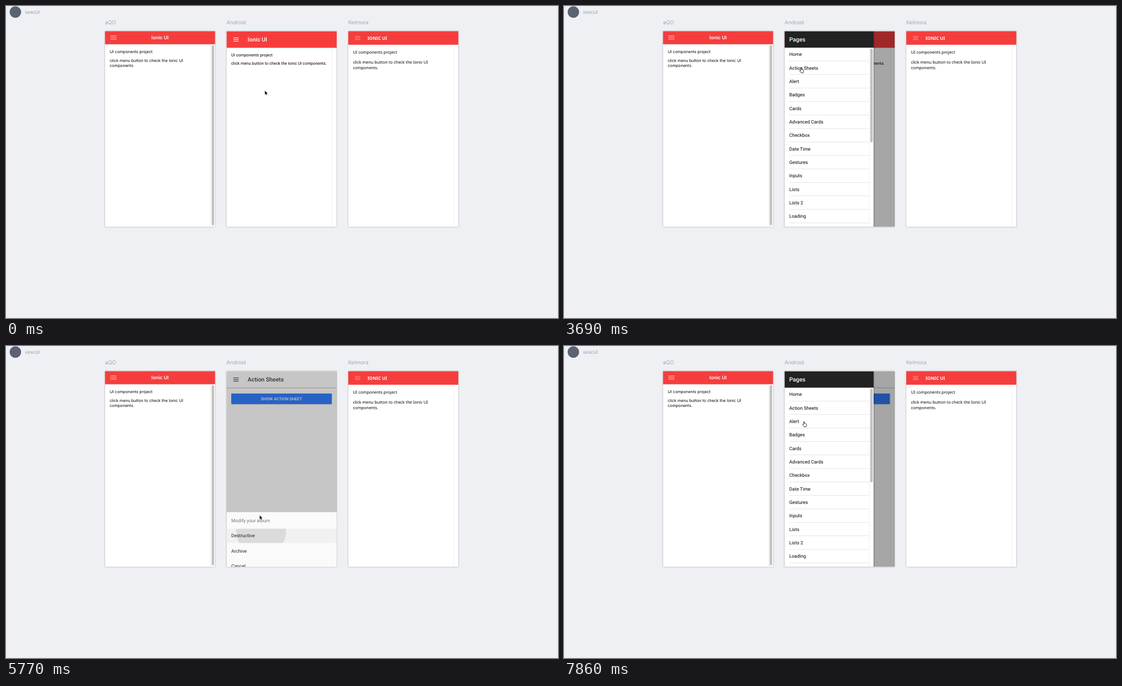
Recreate the animation shown at these times as an HTML page. Size 995 px wide and 563 px high, loop 8000 ms.

```html
<!DOCTYPE html>
<html lang="en">
<head>
<meta charset="utf-8">
<title>Ionic UI preview</title>
<style>
html, body { margin: 0; width: 100%; height: 100%; overflow: hidden; background: #eff0f4; }
svg { display: block; width: 100%; height: 100%; }
text { text-rendering: geometricPrecision; white-space: pre; }
.inter { font-family: Inter, sans-serif; }
.md { font-family: Roboto, sans-serif; }
.noto { font-family: "Noto Sans", sans-serif; }
.label { font: 300 9.6px Inter, sans-serif; fill: #8f939d; }
.card { fill: #fff; filter: drop-shadow(0 .8px 1.1px rgba(0, 0, 0, .38)); }
</style>
</head>
<body>
<svg id="stage" viewBox="0 0 995 563"></svg>
<script>
const RED = '#f63d3d';
const TOP = 45.5, BOTTOM = 398.5, LEFT = 397.5, WIDTH = 198.5;
const BAR = 75.2, ROW = 24.33, MENU = 160.5, SHEET = 114.5;

const rect = (x, y, w, h, fill, more = '') =>
  `<rect x="${x}" y="${y}" width="${w}" height="${h}" fill="${fill}" ${more}/>`;
const text = (x, y, str, size, font, fill = '#000', weight = 400, more = '') =>
  `<text x="${x}" y="${y}" class="${font}" font-size="${size}" font-weight="${weight}" fill="${fill}" ${more}>${str}</text>`;
const burger = (x, y, w, gap, thick, color) =>
  [0, 1, 2].map(i => rect(x, y + i * gap - thick / 2, w, thick, color)).join('');
const card = x => `<rect class="card" x="${x}" y="${TOP}" width="198.3" height="353" rx=".8"/>`;
const track = x => rect(x, BAR, .7, BOTTOM - BAR, '#ececec');
const shade = (id, y, h) => rect(LEFT, y, WIDTH, h, '#000', `id="${id}"`);

const leftCard = card(178.5) +
  rect(178.5, TOP, 198.3, 23.4, RED) +
  rect(178.5, 68.9, 198.3, .5, '#d9a0a0') +
  burger(188, 54, 11, 3, .75, '#fff') +
  text(277.6, 60.3, 'Ionic UI', 8.6, 'inter', '#fff', 600, 'text-anchor="middle"') +
  text(187, 84.6, 'UI components project', 7.2, 'inter') +
  text(187, 101, 'click menu button to check the Ionic UI', 7.2, 'inter') +
  text(187, 109.9, 'components.', 7.2, 'inter') +
  rect(368.6, 69.4, 8.2, 329.1, '#fafafa') +
  rect(368.3, 69.4, .6, 329.1, '#e8e8e8') +
  rect(370.8, 70.4, 4.3, 325.4, '#c1c1c1', 'rx="2.1"');

const rightCard = card(617) +
  rect(617, TOP, 198.3, 24.4, RED) +
  burger(629, 55, 9.6, 2.9, .6, '#ffd5d5') +
  text(651.8, 60.9, 'IONIC UI', 7.9, 'noto', '#fff', 700) +
  text(625.4, 86.4, 'UI components project', 7.4, 'noto') +
  text(625.4, 103.6, 'click menu button to check the Ionic UI', 7.4, 'noto') +
  text(625.4, 113.7, 'components.', 7.4, 'noto') +
  rect(807.2, 69.9, .7, 328.6, '#ececec');

const home = `<g id="home">${
  rect(LEFT, BAR, WIDTH, .9, '#000', 'opacity=".2"') +
  rect(LEFT, TOP, WIDTH, BAR - TOP, RED) +
  burger(409.8, 57.5, 9.5, 3, 1.05, '#fff') +
  text(435.6, 64.1, 'Ionic UI', 10.45, 'md', '#fff', 500) +
  text(406, 90.5, 'UI components project', 7.4, 'md') +
  text(406, 106.3, 'click menu button to check the Ionic UI components.', 7.4, 'md') +
  track(587.8)
}</g>`;

const actions = `<g id="actions">${
  rect(LEFT, BAR, WIDTH, .9, '#000', 'opacity=".28"') +
  burger(409.8, 57.5, 9.5, 3, 1.05, '#424242') +
  text(435.6, 64.1, 'Action Sheets', 10.45, 'md', '#424242', 500) +
  `<g id="line">${track(587.8)}</g>` +
  rect(406, 86.4, 181.3, 19, '#000', 'rx="1" opacity=".22"') +
  rect(406, 85.7, 181.3, 19, '#327eff', 'rx="1" id="button"') +
  '<circle id="tap" cx="479.5" cy="98.5" fill="#555" opacity=".22" clip-path="url(#buttonClip)"/>' +
  text(496.6, 97.9, 'SHOW ACTION SHEET', 7.42, 'md', '#fff', 500, 'text-anchor="middle"')
}</g>`;

// The sheet is drawn with its top edge at y = 0.
const sheet = `<g id="sheet">${
  rect(LEFT, 0, WIDTH, SHEET + 1, '#fafafa') +
  rect(LEFT, 30, WIDTH, 25.7, '#f1f1f1', 'id="pressed"') +
  '<circle id="press" cx="460" cy="34" fill="#555" opacity=".14" clip-path="url(#rowClip)"/>' +
  text(406, 18, 'Modify your album', 8.45, 'md', '#757575') +
  ['Destructive', 'Archive', 'Cancel'].map((s, i) =>
    text(406, 45.6 + i * 27.5, s, 8.45, 'md', '#222')).join('')
}</g>`;

const pages = ['Home', 'Action Sheets', 'Alert', 'Badges', 'Cards', 'Advanced Cards', 'Checkbox',
  'Date Time', 'Gestures', 'Inputs', 'Lists', 'Lists 2', 'Loading'];
const menu = `<g id="menu">${
  rect(LEFT + MENU, TOP, .8, 353, '#000', 'opacity=".22"') +
  rect(LEFT + MENU + .8, TOP, 1.2, 353, '#000', 'opacity=".1"') +
  rect(LEFT, TOP, MENU, 353, '#fff') +
  rect(LEFT, TOP, MENU, BAR - TOP, '#222') +
  text(406, 64.1, 'Pages', 10.45, 'md', '#fff', 500) +
  pages.map((s, i) =>
    text(406, BAR + i * ROW + 15.2, s, 8.45, 'md') +
    rect(406, BAR + (i + 1) * ROW - .4, 144.6, .6, '#d4d4d4')).join('') +
  rect(550.3, BAR, .6, BOTTOM - BAR, '#e8e8e8') +
  rect(552, 77, 4.6, 169, '#c1c1c1', 'rx="2.2" id="thumb"')
}</g>`;

const cursor = `<g id="cursor" stroke-linejoin="round">
  <path id="arrow" d="M0 0V8.2L1.9 6.5 3.1 9.2 4.5 8.6 3.3 6H5.9Z" fill="#000" stroke="#fff" stroke-width=".6"/>
  <path id="hand" d="M-.7 5.3V.8a.8.8 0 0 1 1.6 0V3.5q.8-.4 1.4.2 .8-.3 1.2.4 1-.1 1.1.8V6.4q0 1.2-.8 2.1V9.4H.2Q-.4 8-2.3 6.1-2.9 5-2 4.8-1.3 4.8-.7 5.3Z" fill="#fff" stroke="#000" stroke-width=".8"/>
</g>`;

document.getElementById('stage').innerHTML = `
  <defs>
    <clipPath id="phone">${rect(LEFT, TOP, WIDTH, 353, '#000')}</clipPath>
    <clipPath id="buttonClip">${rect(406, 85.7, 181.3, 19, '#000')}</clipPath>
    <clipPath id="rowClip">${rect(LEFT, 30, WIDTH, 25.7, '#000')}</clipPath>
  </defs>
  ${rect(0, 0, 995, 563, '#eff0f4')}
  <circle cx="16.9" cy="10.8" r="10.4" fill="#5b6272"/>
  ${text(34.8, 13.8, 'ionicUI', 8, 'inter', '#777c88', 300)}
  <text class="label" x="178.5" y="32.6">aQO</text>
  <text class="label" x="397.5" y="32.6">Android</text>
  <text class="label" x="616.8" y="32.6">Kelmora</text>
  ${leftCard}${rightCard}${card(LEFT)}
  <g clip-path="url(#phone)">
    ${home}${actions}${shade('dim', TOP, 353)}${sheet}${menu}
  </g>
  ${cursor}`;

const el = {};
document.querySelectorAll('#stage [id]').forEach(n => el[n.id] = n);

const LOOP = 8000;
// Screen refreshes: first time, last time, count.
const bursts = [[0, 150, 2], [420, 1460, 8], [1610, 2210, 5], [2510, 3540, 8], [3690, 4730, 8],
  [4880, 5920, 8], [6070, 6510, 4], [6810, 7710, 7], [7860, 7860, 1]];
// Pointer stops: time, x, y.
const stops = [
  [0, 466.4, 152.2], [150, 466, 154], [420, 470, 163], [720, 505, 171], [1010, 555, 130],
  [1310, 470, 103], [1460, 422, 93], [1910, 414, 70], [2060, 411.5, 63], [2660, 411.5, 63],
  [3100, 420, 84], [3540, 427.3, 111.2], [3840, 427.3, 111.2], [4280, 472, 97],
  [4430, 476.5, 98.5], [4730, 476.5, 98.5], [5030, 470, 180], [5480, 460, 318],
  [5620, 460, 318], [5770, 457, 305], [5920, 450, 250], [6220, 416, 95], [6360, 412, 70],
  [6510, 415.6, 63.8], [6960, 415.6, 63.8], [7560, 432.6, 136.4], [LOOP, 432.6, 136.4]];

const clamp = v => Math.min(1, Math.max(0, v));
const ease = (t, start, length) => 1 - (1 - clamp((t - start) / length)) ** 2;
const show = (node, on) => node.setAttribute('display', on ? 'inline' : 'none');

function refresh(t) {
  const [a, b, n] = bursts.filter(s => s[0] <= t).pop();
  if (n < 2) return a;
  const gap = (b - a) / (n - 1);
  const k = Math.min(n - 1, Math.floor((t - a) / gap + .04));
  return Math.round((a + k * gap) / 10) * 10;
}

function pointer(t) {
  const i = stops.findIndex(s => s[0] > t);
  const [t0, x0, y0] = stops[i - 1], [t1, x1, y1] = stops[i];
  const u = (t - t0) / (t1 - t0);
  return [x0 + (x1 - x0) * u, y0 + (y1 - y0) * u];
}

function draw(time) {
  const t = refresh(time);

  const onActions = t >= 3750;
  show(el.home, !onActions);
  show(el.actions, onActions);
  show(el.line, t < 4440 || t >= 6070);

  const second = t >= 6700;
  const open = second ? ease(t, 6717, 240) : ease(t, 2417.5, 240) - ease(t, 3750, 240);
  show(el.menu, open > 0);
  el.menu.setAttribute('transform', `translate(${MENU * (open - 1)} 0)`);
  el.thumb.setAttribute('height', t >= (second ? 7860 : 3560) ? 169 : 166);

  const up = ease(t, 4447, 240) - ease(t, 5760, 140);
  show(el.sheet, up > 0);
  el.sheet.setAttribute('transform', `translate(0 ${BOTTOM - SHEET * up})`);
  el.dim.setAttribute('opacity', .35 * open + .26 * up);

  const tapped = t >= 4440 && t < 4700;
  el.button.setAttribute('fill', tapped ? '#3071e0' : '#327eff');
  el.tap.setAttribute('r', tapped ? 52 * clamp((t - 4440) / 140) : 0);

  const pressing = t >= 5590 && t < 5910;
  show(el.pressed, pressing);
  el.press.setAttribute('r', pressing ? 45 * (t - 5590) / 180 : 0);

  const [x, y] = pointer(t);
  const hand = t >= 1900 && t < 3900 || t >= 6300;
  el.cursor.setAttribute('transform', `translate(${x} ${y})`);
  show(el.hand, hand);
  show(el.arrow, !hand);
}

const begin = performance.now();
function tick() {
  draw((performance.now() - begin) % LOOP);
  requestAnimationFrame(tick);
}
tick();
</script>
</body>
</html>
```
